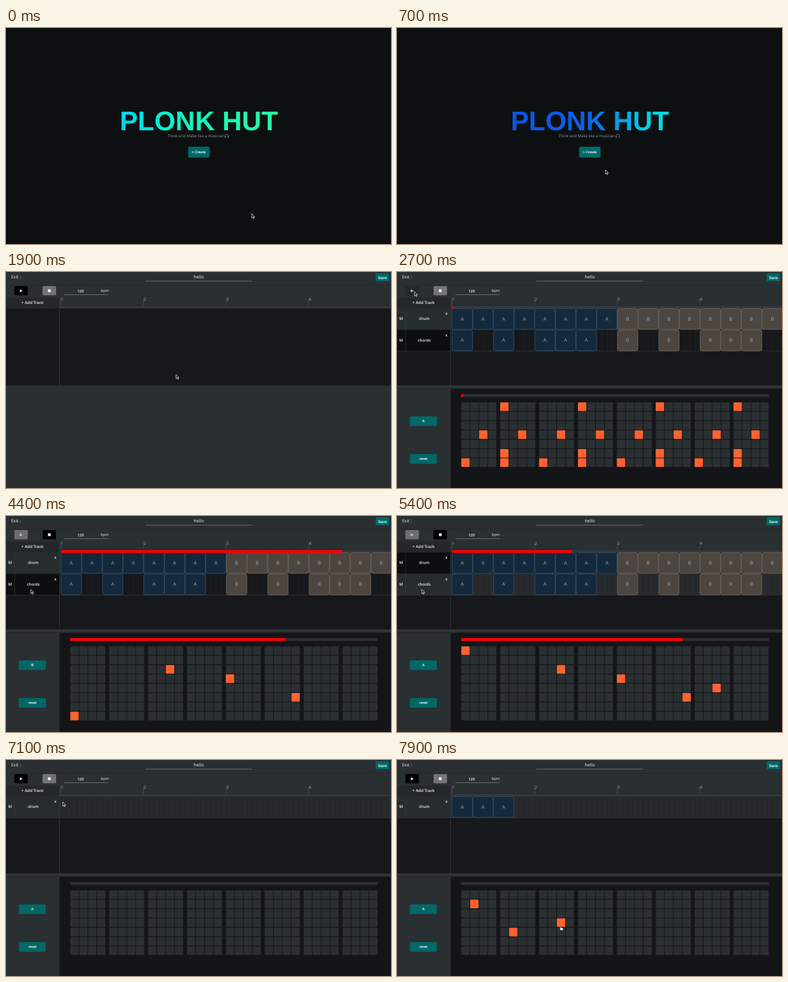
Write an HTML page that moves like this. It is 600x338 px and loops after 8000 ms.

```html
<!DOCTYPE html>
<html lang="en">
<head>
<meta charset="utf-8">
<title>Music sequencer</title>
<style>
  html, body { margin: 0; width: 100%; height: 100%; overflow: hidden; background: #0d1011; }
  svg { display: block; width: 100vw; height: 100vh; }
  text { font-family: "Open Sans", "Noto Sans", sans-serif; font-size: 6.2px; fill: #f2f2f2; text-anchor: middle; text-rendering: geometricPrecision; }
  .bold { font-weight: 600; }
  .logo { font: bold 42.3px "Liberation Sans", Arial, sans-serif; fill: url(#shine); }
  .btn { font: 5.6px "Liberation Sans", Arial, sans-serif; stroke: #f2f2f2; stroke-width: .15px; }
  .note { font-size: 6.1px; fill: #94999b; }
  .num { fill: #a9adaf; }
  .block text { font-size: 7.5px; fill: #a3abb2; }
  .teal { fill: #016868; }
</style>
</head>
<body>
<svg id="stage" viewBox="0 0 600 338" preserveAspectRatio="none">
  <defs>
    <linearGradient id="shine" gradientUnits="userSpaceOnUse" y1="0" y2="0">
      <stop offset="0" stop-color="#0b4fe0"/>
      <stop offset=".32" stop-color="#0a62e6"/>
      <stop offset=".5" stop-color="#00d0ec"/>
      <stop offset=".64" stop-color="#00f4d0"/>
      <stop offset="1" stop-color="#2cff9b"/>
    </linearGradient>
  </defs>

  <g id="home">
    <rect width="600" height="338" fill="#0d1011"/>
    <text class="logo" x="300.5" y="160">PLONK HUT</text>
    <text class="note" x="296" y="171">Think and Make like a musician</text>
    <path d="M341.6 170v-1.2a2.5 2.6 0 0 1 5 0v1.2" fill="none" stroke="#8d9295" stroke-width=".7"/>
    <path d="M341.4 169.2h1.2v2.6h-1.2zM345.6 169.2h1.2v2.6h-1.2z" fill="#8d9295"/>
    <rect class="teal" x="283.8" y="185.8" width="33.4" height="17" rx="2"/>
    <text class="btn" x="300.3" y="196.2">+ Create</text>
  </g>

  <g id="modal">
    <rect width="600" height="338" fill="#7b7170" opacity=".3"/>
    <rect x="196" y="40" width="209" height="259.5" rx="4" fill="#15171b"/>
    <text class="bold" x="390" y="56.3">X</text>
    <text class="bold" x="300.3" y="149.8" style="font-size:6.5px">Title</text>
    <rect x="257.5" y="156" width="85.5" height="13.5" fill="#2a2f33"/>
    <rect x="257.5" y="169" width="85.5" height=".8" fill="#74827f"/>
    <text id="typed" x="260" y="165" style="text-anchor:start"></text>
    <rect class="teal" x="279.4" y="173.8" width="42" height="21" rx="2"/>
    <text class="btn" x="300.3" y="186">submit</text>
  </g>

  <g id="editor">
    <rect width="600" height="338" fill="#2a2f32"/>
    <rect y="20" width="600" height=".7" fill="#23272a"/>
    <text x="13.8" y="10.4" style="font-size:6.8px">Exit</text>
    <rect x="22.3" y="5" width=".7" height="7" fill="#666b6e"/>
    <text x="300.5" y="10.2" style="font-size:7px">hello</text>
    <rect x="217" y="13.8" width="167" height=".8" fill="#73787b"/>
    <rect class="teal" x="576" y="2" width="21" height="12.5" rx="1.5"/>
    <text class="btn" x="586.6" y="10.6" style="font-size:6.1px">Save</text>
    <rect id="play" x="13" y="22" width="21" height="14.5" rx="2"/>
    <path id="playIcon" d="M21.6 27v4.8l4.4-2.4z"/>
    <rect id="stop" x="57" y="22" width="21" height="14.5" rx="2"/>
    <rect x="65.4" y="27.2" width="4.2" height="4.2" fill="#fff"/>
    <text class="bold" x="116.3" y="31.7" style="font-size:5.9px">120</text>
    <rect x="91" y="35" width="69" height=".8" fill="#73787b"/>
    <text x="154" y="31" style="font-size:5.8px">bpm</text>
    <rect id="add" y="40" width="83" height="17"/>
    <text class="bold" x="41.3" y="50">+ Add Track</text>
    <g id="ruler"></g>
    <rect y="57" width="600" height="120.5" fill="#17181b"/>
    <g id="rows"></g>
    <rect x="83" y="40" width=".9" height="138" fill="#35393c"/>
    <rect id="songBar" x="86" y="53.2" height="4.6" fill="#f60000"/>
    <g id="panel">
      <rect y="177.5" width="600" height="5" fill="#2f3437"/>
      <rect y="182" width="600" height=".8" fill="#1c1f21"/>
      <rect x="83.5" y="182.8" width="516.5" height="156" fill="#141518"/>
      <rect class="teal" x="20" y="226" width="42" height="15" rx="1.5"/>
      <text id="letter" class="btn" x="41" y="235.3"></text>
      <rect class="teal" x="20" y="285" width="42" height="15" rx="1.5"/>
      <text class="btn" x="41.2" y="294.3">reset</text>
      <rect x="100" y="191" width="479.5" height="4.6" fill="#2f2e30"/>
      <rect id="loopBar" x="100" y="191" height="4.6" fill="#f60000"/>
      <g id="cells"></g>
    </g>
  </g>

  <path id="arrow" d="M0 0v6.6l1.5-1.4 1.1 2.4 1.1-.5-1.1-2.3h2z" fill="#111" stroke="#fff" stroke-width=".7"/>
  <path id="hand" d="M-.8 .3q.8-.9 1.3 0v2l3 .7q.7.2.5 1.2l-.5 2.4h-3.4l-2-2.5q.2-.9 1.1-.1z" fill="#fff" stroke="#111" stroke-width=".5"/>
</svg>

<script>
const LOOP = 8000, STEP = 100;
const BLOCK = 32.2, LEFT = 85.7;
const PLAY = 2700, STOP = 6200;
const $ = id => document.getElementById(id);

function make(parent, tag, attrs, text) {
  const el = document.createElementNS('http://www.w3.org/2000/svg', tag);
  for (const k in attrs) el.setAttribute(k, attrs[k]);
  if (text) el.textContent = text;
  parent.append(el);
  return el;
}
const show = (el, on) => { el.style.display = on ? '' : 'none'; };
const fill = (el, color) => el.setAttribute('fill', color);

// ruler
make($('ruler'), 'rect', { x: 84, y: 52.6, width: 516, height: 4.6, fill: '#34383b' });
make($('ruler'), 'rect', { x: 84, y: 52, width: 516, height: .7, fill: '#1e2225' });
for (let bar = 0; bar < 4; bar++) {
  const x = LEFT + bar * 4 * BLOCK;
  make($('ruler'), 'rect', { x: x - .4, y: 40, width: .7, height: 12.4, fill: '#555b5e' });
  make($('ruler'), 'text', { x: x + 2, y: 45.2, class: 'num' }, String(bar + 1));
}

// tracks
function makeRow(name, y, used) {
  const g = make($('rows'), 'g', {});
  const side = make(g, 'rect', { y, width: 83, height: 33.5 });
  const lane = make(g, 'rect', { x: 84, y, width: 516, height: 33.5 });
  for (let i = 0; i <= 64; i++)
    make(g, 'rect', { x: LEFT + i * BLOCK / 4, y, width: .7, height: 33.5, fill: '#202326' });
  make(g, 'rect', { y: y + 33, width: 600, height: .7, fill: '#34383b' });
  make(g, 'rect', { x: 13, y, width: .7, height: 33.5, fill: '#34383b' });
  make(g, 'text', { x: 6.3, y: y + 18.2, class: 'bold' }, 'M');
  make(g, 'text', { x: 42.5, y: y + 18.2, class: 'bold' }, name);
  make(g, 'text', { x: 77, y: y + 10, class: 'bold' }, 'x');
  const blocks = used.map(i => {
    const b = make(g, 'g', { class: 'block' }), isA = i < 8, x = LEFT + i * BLOCK;
    make(b, 'rect', { x: x + .3, y: y + .3, width: 31.6, height: 32.6, rx: 2.5, 'stroke-width': .8,
      fill: isA ? '#14293c' : '#4d4540', stroke: isA ? '#3c566e' : '#756b64' });
    make(b, 'text', { x: x + 16, y: y + 18.9 }, isA ? 'A' : 'B');
    return b;
  });
  return { g, side, lane, blocks };
}
const drum = makeRow('drum', 57, [...Array(16).keys()]);
const chords = makeRow('chords', 90.5, [0, 2, 4, 5, 6, 8, 10, 12, 13, 14]);

function select(row, on) {
  fill(row.side, on ? '#272c2f' : '#0d0e10');
  fill(row.lane, on ? '#272b2e' : '#17181b');
}

// step grid
const cells = [];
for (let row = 0; row < 8; row++)
  for (let col = 0; col < 32; col++) {
    const x = 100.2 + (col >> 2) * 60.6 + (col & 3) * 13.9;
    cells.push({ row, col, el: make($('cells'), 'rect',
      { x, y: 204 + row * 14.6, width: 13, height: 13.5, rx: .8 }) });
  }

const shared = ['2,10', '3,16', '5,23'];
const patterns = {
  drumA: (r, c) => c % 4 === 0 && r === 6 || c % 4 === 2 && r === 3 || c % 8 === 4 && (r === 0 || r === 5),
  drumB: (r, c) => c % 4 === 0 && r === 6 || c % 4 === 2 && r === 3 || c % 8 === 4 && r === 5,
  chordsA: (r, c) => ['0,0', '4,26', ...shared].includes(r + ',' + c),
  chordsB: (r, c) => ['7,0', ...shared].includes(r + ',' + c)
};
const clicks = [[7600, 1, 1], [7800, 4, 5], [7900, 3, 10]];

// pointer: time, x, y
const path = [
  [0, 383, 290.7], [200, 383, 290.7], [900, 301.5, 194.4], [1100, 301.5, 194.4], [1300, 300, 163], [1600, 300, 163],
  [1800, 300, 184], [2200, 160, 90], [2600, 27.3, 30.7], [3500, 27.3, 30.7], [4200, 38.7, 114.8], [5500, 38.7, 114.8],
  [6100, 66, 30], [6300, 66, 30], [6700, 63.7, 50.8], [6900, 63.7, 50.8], [7200, 101, 73], [7400, 166, 73],
  [7600, 120, 226], [7800, 181, 269], [7900, 255, 260]
];
function pointer(t) {
  const i = path.findIndex(p => p[0] >= t);
  if (i <= 0) return path[0].slice(1);
  const [a, b] = [path[i - 1], path[i]], k = (t - a[0]) / (b[0] - a[0]);
  return [1, 2].map(n => a[n] + (b[n] - a[n]) * k);
}

function drawHome(t) {
  const k = Math.min(t / 1000, 1), x = -70 + 270 * k * k * (3 - 2 * k);
  $('shine').setAttribute('x1', x);
  $('shine').setAttribute('x2', x + 494);
  show($('modal'), t >= 1000);
  $('typed').textContent = 'hello'.slice(0, Math.max(0, (t - 1200) / 100));
}

function drawEditor(t) {
  const song = t >= 2200 && t < 6400, build = t >= 7100;
  const playing = t >= PLAY && t < STOP;
  const beat = playing ? Math.max(0, (t - 2737) * .00818) % 16 : 0;
  const loop = t > PLAY ? (.7 + (t - 4400) * .00802 + 32) % 1 : .008;
  const letter = beat < 8 ? 'A' : 'B';
  const onChords = song && t >= 4300;

  fill($('play'), t === PLAY ? '#24282b' : playing ? '#6d6d6d' : '#000');
  fill($('playIcon'), playing ? '#c8c8c8' : '#fff');
  fill($('stop'), playing && t > PLAY ? '#000' : '#747474');
  fill($('add'), t >= 6600 && t < 7000 ? '#15484b' : '#24282b');

  show($('songBar'), playing);
  show($('loopBar'), playing);
  $('songBar').setAttribute('width', Math.max(2.4, beat * BLOCK));
  $('loopBar').setAttribute('width', loop * 479.5);

  show(drum.g, song || build);
  show(chords.g, song);
  select(drum, t < 4500 || build);
  select(chords, t >= 4500);
  drum.blocks.forEach((b, i) => show(b, song || t >= 7200 + i * 100 && i < 3));

  show($('panel'), song || build);
  $('letter').textContent = letter;
  const lit = build
    ? (r, c) => clicks.some(k => t >= k[0] && k[1] === r && k[2] === c)
    : patterns[(onChords ? 'chords' : 'drum') + letter];
  for (const { row, col, el } of cells) {
    show(el, row < 7 || onChords);
    fill(el, lit(row, col) ? '#ff6230' : '#2a2f32');
  }
}

function draw(t) {
  const atHome = t < 1900, overGrid = t >= 7500;
  show($('home'), atHome);
  show($('modal'), false);
  show($('editor'), !atHome);
  atHome ? drawHome(t) : drawEditor(t);
  const [x, y] = pointer(t);
  show($('arrow'), !overGrid);
  show($('hand'), overGrid);
  $(overGrid ? 'hand' : 'arrow').setAttribute('transform', `translate(${x} ${y})`);
}

let last = -1;
function tick() {
  const t = Math.floor(performance.now() % LOOP / STEP) * STEP;
  if (t !== last) draw(last = t);
  requestAnimationFrame(tick);
}
tick();
</script>
</body>
</html>
```
